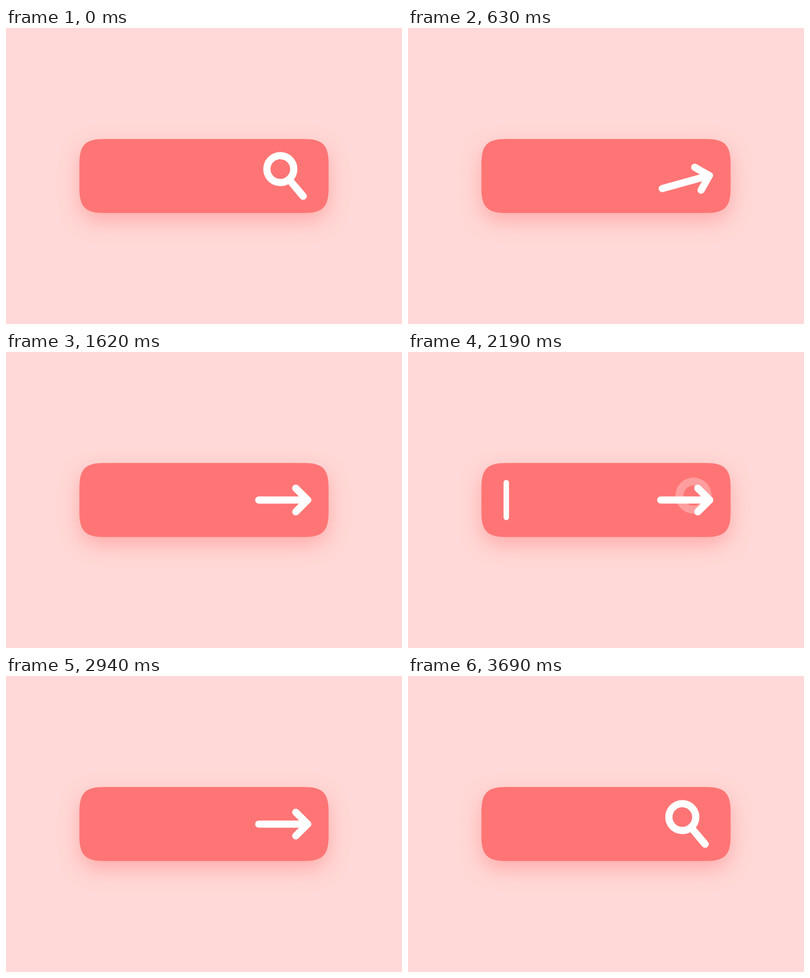
Animation, 800 px wide and 600 px high, one loop 4.05 s. Source, as an HTML page with a canvas:

```html
<!DOCTYPE html>
<html lang="en">
<head>
<meta charset="utf-8">
<title>Search field</title>
<style>
  html, body { margin: 0; width: 100%; height: 100%; overflow: hidden; background: #ffd9d7; }
  canvas { display: block; width: 800px; height: 600px; }
</style>
</head>
<body>
<canvas id="stage" width="800" height="600"></canvas>
<script>
const ctx = document.getElementById('stage').getContext('2d');
const LOOP = 4050;
const STEP = 30;
const STROKE = 14.6;
const TAIL = -69.4;
const TIP = 29.4;
const RING = 27.2;
const BARB = 24;
const TILT = 50 * Math.PI / 180;

const clamp = u => Math.min(1, Math.max(0, u));
const mix = (a, b, u) => a + (b - a) * u;
const ramp = (t, from, to) => clamp((t - from) / (to - from));
const smooth = (t, from, to) => {
  const u = ramp(t, from, to);
  return u * u * (3 - 2 * u);
};
const easeOut = (t, from, to) => 1 - (1 - ramp(t, from, to)) ** 2;
// Value that is 1 inside the window and eases in and out at its edges.
const pulse = (t, inA, inB, outA, outB) => smooth(t, inA, inB) - smooth(t, outA, outB);

// Underdamped spring falling from 1 to 0.
function spring(t, start, speed) {
  const phase = Math.max(0, t - start) / 1000 * speed;
  return Math.exp(-0.36 * phase) * (Math.cos(phase) + 0.36 * Math.sin(phase));
}

function line(...points) {
  ctx.beginPath();
  points.forEach(([x, y]) => ctx.lineTo(x, y));
  ctx.stroke();
}

function drawBar() {
  const [left, top, right, bottom] = [148.3, 225, 651.7, 375];
  const r = 50, k = 12;
  ctx.save();
  ctx.beginPath();
  ctx.moveTo(left + r, top);
  ctx.lineTo(right - r, top);
  ctx.bezierCurveTo(right - k, top, right, top + k, right, top + r);
  ctx.lineTo(right, bottom - r);
  ctx.bezierCurveTo(right, bottom - k, right - k, bottom, right - r, bottom);
  ctx.lineTo(left + r, bottom);
  ctx.bezierCurveTo(left + k, bottom, left, bottom - k, left, bottom - r);
  ctx.lineTo(left, top + r);
  ctx.bezierCurveTo(left, top + k, left + k, top, left + r, top);
  ctx.closePath();
  ctx.shadowColor = 'rgba(255, 117, 117, 0.45)';
  ctx.shadowBlur = 40;
  ctx.shadowOffsetY = 16;
  ctx.fillStyle = '#ff7575';
  ctx.fill();
  ctx.restore();
}

function drawCursor(t) {
  const alpha = pulse(t, 990, 1150, 1350, 1530) + pulse(t, 1700, 1880, 2250, 2430);
  if (alpha <= 0) return;
  ctx.save();
  ctx.globalAlpha = alpha;
  ctx.lineWidth = 11;
  line([198.5, 264.7], [198.5, 335.3]);
  ctx.restore();
}

function iconPose(t) {
  if (t < 2800) {
    return {
      angle: TILT * spring(t, 377, 13.5),
      lift: smooth(t, 420, 780),
      ring: 1 - smooth(t, 335, 550),
      barbs: smooth(t, 290, 540),
      nudge: 8 * (easeOut(t, 2250, 2400) - smooth(t, 2400, 2760))
    };
  }
  return {
    angle: TILT * (t < 3690 ? 1 - spring(t, 2960, 11) : 1),
    lift: 1 - smooth(t, 2920, 3240),
    ring: smooth(t, 3000, 3300),
    barbs: 1 - smooth(t, 3100, 3355),
    nudge: 0
  };
}

function drawIcon(t) {
  const pose = iconPose(t);
  const ringHeight = RING * pose.ring;
  const spread = BARB * pose.barbs;
  ctx.save();
  ctx.translate(mix(581.3, 580, pose.lift) + pose.nudge, mix(318.3, 300, pose.lift));
  ctx.rotate(pose.angle);
  ctx.lineWidth = STROKE;
  if (ringHeight < 0.5) {
    line([TAIL, 0], [TIP, 0]);
  } else {
    ctx.beginPath();
    ctx.ellipse(TAIL + RING, 0, RING, ringHeight, 0, 0, Math.PI * 2);
    ctx.closePath();
    ctx.stroke();
    line([TAIL + 2 * RING, 0], [TIP, 0]);
  }
  line([TIP - BARB, -spread], [TIP, 0], [TIP - BARB, spread]);
  ctx.restore();
}

function drawRipple(t, start, x, y) {
  const n = (t - start) / STEP;
  const alpha = 0.37 - 0.0356 * n;
  if (n < 0 || alpha <= 0) return;
  const outer = 3.2 + 17.4 * n - 0.385 * n * n;
  const inner = Math.max(0, outer - 18.3 + 1.14 * n);
  ctx.fillStyle = `rgba(255, 255, 255, ${alpha})`;
  ctx.beginPath();
  ctx.arc(x, y, outer, 0, Math.PI * 2);
  ctx.arc(x, y, inner, 0, Math.PI * 2, true);
  ctx.fill();
}

function draw(t) {
  ctx.fillStyle = '#ffd9d7';
  ctx.fillRect(0, 0, 800, 600);
  drawBar();
  ctx.strokeStyle = '#fff';
  ctx.lineCap = ctx.lineJoin = 'round';
  drawRipple(t, 90, 215, 304.5);
  drawRipple(t, 2130, 576.7, 291);
  drawCursor(t);
  drawIcon(t);
}

function tick() {
  const t = performance.now() % LOOP;
  draw(Math.floor(t / STEP) * STEP);
  requestAnimationFrame(tick);
}
tick();
</script>
</body>
</html>
```
